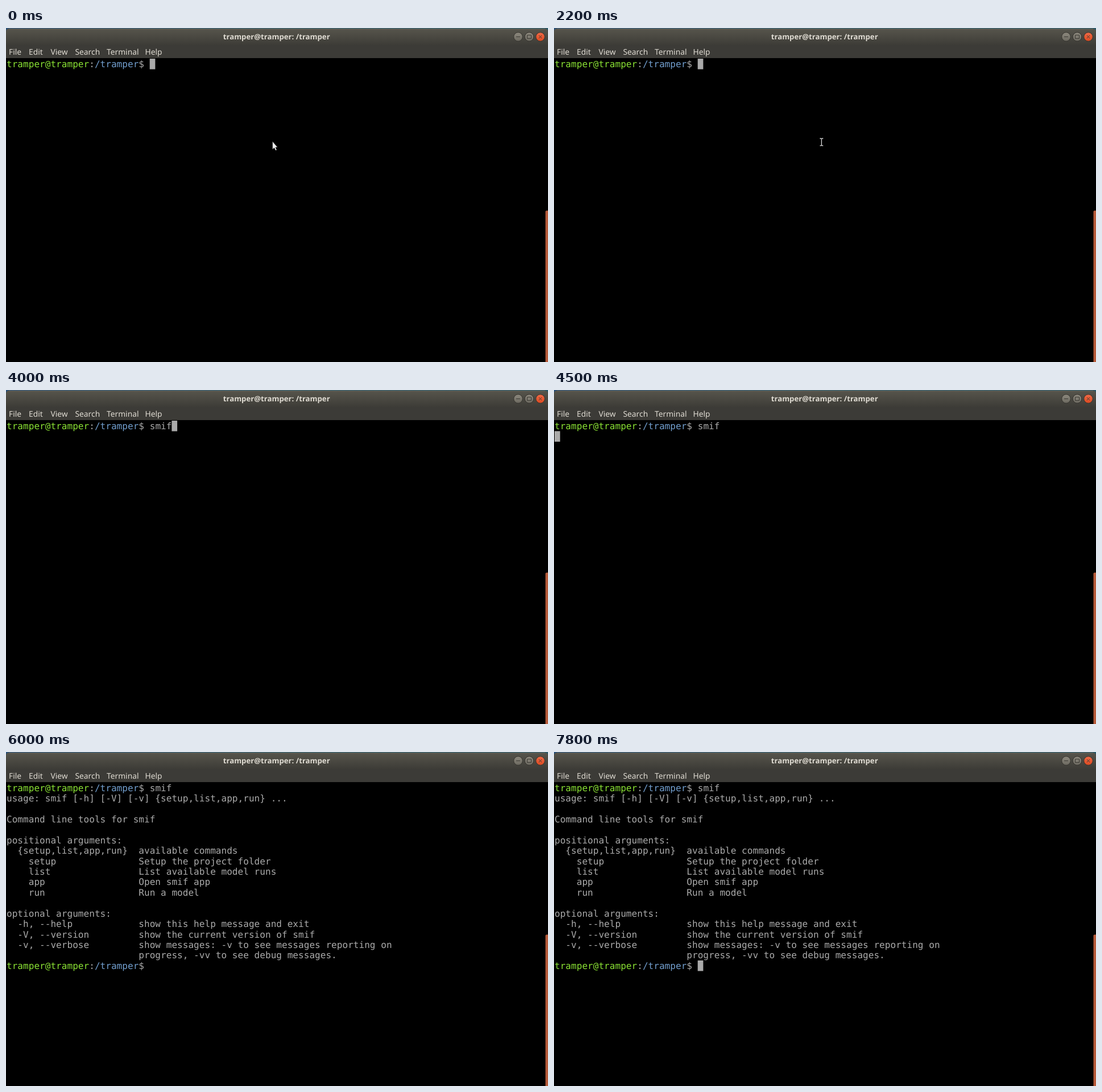
Recreate the animation shown at these times as an HTML page. Size 953 by 588 pixels, loop 8 s.

```html
<!DOCTYPE html>
<html lang="en">
<head>
<meta charset="utf-8">
<title>Terminal</title>
<style>
  html, body { margin: 0; width: 100%; height: 100%; overflow: hidden; background: #000; }
  svg { display: block; width: 953px; height: 588px; }
  text { white-space: pre; text-rendering: geometricPrecision; }
  .ui { font-family: "Noto Sans", "Open Sans", sans-serif; font-size: 13.8px; fill: #dfdbd2; }
  .title { font-size: 13.2px; font-weight: 700; text-anchor: middle; }
  .term { font-family: "DejaVu Sans Mono", monospace; font-size: 16.08px; fill: #aaa; }
  .user { fill: #8ae234; }
  .path { fill: #729fcf; }
</style>
</head>
<body>
<svg viewBox="0 0 953 588">
  <defs>
    <linearGradient id="bar" x1="0" y1="0" x2="0" y2="1">
      <stop offset="0" stop-color="#57554c"/>
      <stop offset="1" stop-color="#3d3c37"/>
    </linearGradient>
    <linearGradient id="desk">
      <stop offset="0" stop-color="#29517a"/>
      <stop offset=".5" stop-color="#2c5e70"/>
      <stop offset="1" stop-color="#28596a"/>
    </linearGradient>
    <linearGradient id="grey" x1="0" y1="0" x2="0" y2="1">
      <stop offset="0" stop-color="#8d897e"/>
      <stop offset="1" stop-color="#6b685f"/>
    </linearGradient>
    <linearGradient id="red" x1="0" y1="0" x2="0" y2="1">
      <stop offset="0" stop-color="#ef6a48"/>
      <stop offset="1" stop-color="#dd4a20"/>
    </linearGradient>
  </defs>

  <rect width="953" height="588"/>
  <rect width="953" height="8" fill="url(#desk)"/>
  <path d="M0 53V7Q0 1 6 1H947Q953 1 953 7V53Z" fill="#3c3b37"/>
  <path d="M0 30V7Q0 1 6 1H947Q953 1 953 7V30Z" fill="url(#bar)"/>
  <path d="M5 1.5H948" stroke="#65635a"/>

  <g class="ui">
    <text class="title" x="475.7" y="20">tramper@tramper: /tramper</text>
    <g id="menu"></g>
  </g>

  <g stroke="#33322d">
    <circle cx="900.5" cy="15.5" r="7.8" fill="url(#grey)"/>
    <circle cx="920" cy="15.5" r="7.8" fill="url(#grey)"/>
    <circle cx="939.5" cy="15.5" r="7.8" fill="url(#red)"/>
    <path d="M897 15.5h7M916.5 12.5h7v6h-7zM937 13l5 5m0-5l-5 5" fill="none" stroke="#3a3832"/>
  </g>

  <path d="M948.5 588V323.5Q948.5 321.5 950.5 321.5H953V588Z" fill="#b65a3a"/>

  <g class="term">
    <g id="first"></g>
    <g id="output"></g>
  </g>
  <rect id="cursor" width="9.7" height="18.6" fill="#aaa"/>

  <path id="arrow" d="M468.7 199.8V213.6L471.7 210.9L474 215.6L476 214.7L473.9 210H477.4Z"
        fill="#eee" stroke="#222" stroke-width=".5"/>
  <path id="beam" d="M467.5 194.5H469.4L470.4 195.2L471.4 194.5H473.3M470.4 195V206.5M467.5 207.1H469.4L470.4 206.4L471.4 207.1H473.3"
        fill="none" stroke="#ddd" stroke-width="1.3"/>
</svg>
<script>
const $ = id => document.getElementById(id);
const LOOP = 8000, LEFT = 1, TOP = 54, CELL = 9.68, ROW = 18.41, PROMPT_COLS = 26;
const colX = col => LEFT + col * CELL;
const rowY = row => TOP + row * ROW;

const label = (x, y, body) => `<text x="${x}" y="${y}">${body}</text>`;
const line = (row, body) => label(LEFT, rowY(row) + 14.8, body);
const prompt = typed =>
  `<tspan class="user">tramper@tramper</tspan>:<tspan class="path">/tramper</tspan>$ ${typed}`;

const menu = [["File", 5], ["Edit", 40], ["View", 78.5], ["Search", 121.5], ["Terminal", 177], ["Help", 244.5]];
$("menu").innerHTML = menu.map(([name, x]) => label(x, 47, name)).join("");

const entry = (name, help) => name.padEnd(24) + help;
const help = [
  "usage: smif [-h] [-V] [-v] {setup,list,app,run} ...",
  "",
  "Command line tools for smif",
  "",
  "positional arguments:",
  entry("  {setup,list,app,run}", "available commands"),
  entry("    setup", "Setup the project folder"),
  entry("    list", "List available model runs"),
  entry("    app", "Open smif app"),
  entry("    run", "Run a model"),
  "",
  "optional arguments:",
  entry("  -h, --help", "show this help message and exit"),
  entry("  -V, --version", "show the current version of smif"),
  entry("  -v, --verbose", "show messages: -v to see messages reporting on"),
  entry("", "progress, -vv to see debug messages."),
  prompt("")
];
$("output").innerHTML = help.map((body, i) => line(i + 1, body)).join("");

// Each step: start time, typed text, cursor row, cursor lit, pointer
const steps = [
  [0, "", 0, true, "arrow"],
  [400, "", 0, false, "beam"],
  [1000, "", 0, true, "beam"],
  [1600, "", 0, false, "beam"],
  [2200, "", 0, true, "beam"],
  [2700, "s", 0, true],
  [3000, "sm", 0, true],
  [3100, "smi", 0, true],
  [4000, "smif", 0, true],
  [4500, "smif", 1, true],
  [4900, "smif", 17, false],
  [5400, "smif", 17, true],
  [6000, "smif", 17, false],
  [6600, "smif", 17, true],
  [7200, "smif", 17, false],
  [7800, "smif", 17, true]
];

const show = (id, on) => $(id).setAttribute("visibility", on ? "visible" : "hidden");
let current;

function draw(step) {
  const [, typed, row, lit, pointer] = step;
  const col = row === 0 ? PROMPT_COLS + typed.length : row === 1 ? 0 : PROMPT_COLS;
  $("first").innerHTML = line(0, prompt(typed));
  $("cursor").setAttribute("x", colX(col));
  $("cursor").setAttribute("y", rowY(row));
  show("cursor", lit);
  show("output", row > 1);
  show("arrow", pointer === "arrow");
  show("beam", pointer === "beam");
}

const start = performance.now();
function tick() {
  const t = Math.max(0, performance.now() - start) % LOOP;
  const step = steps.findLast(s => s[0] <= t);
  if (step !== current) draw(current = step);
  requestAnimationFrame(tick);
}
tick();
</script>
</body>
</html>
```
